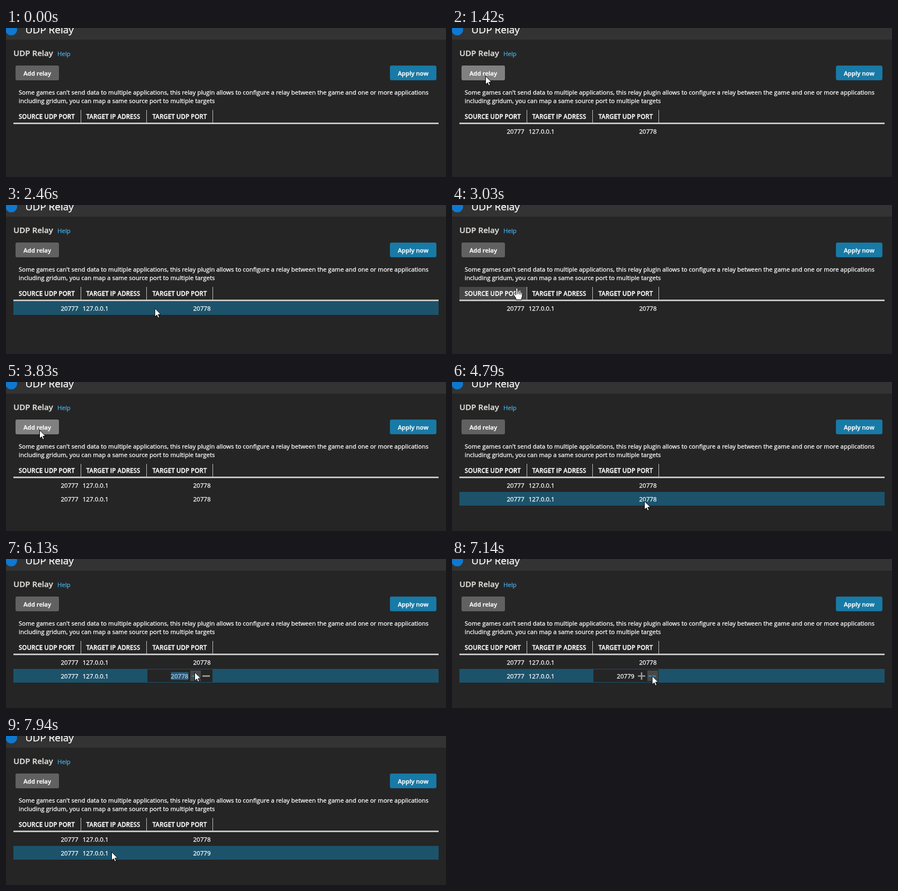
An HTML page that plays this animation: 831 by 282 pixels, repeating every 8000 ms.

```html
<!DOCTYPE html>
<html lang="en">
<head>
<meta charset="utf-8">
<title>UDP Relay</title>
<style>
html, body { margin: 0; width: 100%; height: 100%; overflow: hidden; background: #252525; }
svg { display: block; width: 831px; height: 282px; }
text {
  font: 11.44px "Open Sans", "Noto Sans", sans-serif; color: #fff;
  fill: currentColor; stroke: currentColor; stroke-width: .3px; white-space: pre;
}
.bold { font-weight: 600; }
.head { font-size: 11.6px; font-weight: 600; }
.cell { font-size: 11.6px; }
.num { text-anchor: end; }
</style>
</head>
<body>
<svg viewBox="0 0 831 282">
  <rect width="831" height="282" fill="#252525"/>
  <rect width="831" height="22" fill="#333"/>
  <circle cx="10" cy="3" r="11" fill="#0f78d0"/>
  <text x="36.5" y="10" style="font-size:19px">UDP Relay</text>
  <text x="14" y="53" class="bold" style="font-size:15.1px;color:#dedbd8">UDP Relay</text>
  <text x="97" y="53" style="font-size:11.5px;color:#45aee8">Help</text>

  <rect id="add" x="18" y="71" width="82" height="28" rx="3"/>
  <text x="33" y="90" class="bold">Add relay</text>
  <rect x="725.5" y="71.5" width="87" height="27" rx="2.5" fill="#187aa6" stroke="#1a6f96"/>
  <text x="740" y="90" class="bold" style="font-size:11.5px">Apply now</text>

  <text x="24" y="126">Some games can't send data to multiple applications, this relay plugin allows to configure a relay between the game and one or more applications</text>
  <text x="24" y="142">including gridum, you can map a same source port to multiple targets</text>

  <g id="heads"></g>
  <rect x="14" y="179" width="803" height="3" fill="#c4c4c4"/>
  <g id="rows"></g>

  <g id="edit">
    <rect x="267" y="209" width="123" height="24" fill="#252525"/>
    <rect id="mark" x="311.5" y="214" width="33" height="15" fill="#2a5876"/>
    <text id="value" x="344.5" y="226" class="cell num"></text>
    <rect id="plusBox" x="348" y="211" width="20" height="20"/>
    <path id="plus" d="M351 221.5h14M358 214.5v14" stroke-width="2.6"/>
    <rect id="minusBox" x="369" y="211" width="20" height="20"/>
    <path id="minus" d="M371 221.5h14" stroke-width="2.8"/>
  </g>

  <g id="cursor" fill="#fff" stroke="#000" stroke-linejoin="round">
    <path id="arrow" d="M.5 .5V16.6L4.2 13.1 6.6 18.6 9.1 17.5 6.7 12.1H11.8Z"/>
    <g id="hand" transform="translate(-1.5 0)">
      <path d="M-1.6 13V1.6a1.6 1.6 0 0 1 3.2 0V8c0-1.6 3-1.6 3.1.2 .3-1.3 2.9-1.2 3 .4 .4-1 2.7-.8 2.7.8v5c0 2.8-1.6 3.8-1.6 7.8H-1.2c0-3-1.9-4.9-5-9.7-.9-1.7 1.2-3.2 2.6-1.7Z"/>
      <path d="M1.6 8v4M4.7 8.2v4M7.7 8.6v4" fill="none"/>
    </g>
  </g>
</svg>
<script>
const LOOP = 8000;
const $ = id => document.getElementById(id);
const make = (parent, tag, attrs, text = "") => {
  const el = document.createElementNS("http://www.w3.org/2000/svg", tag);
  for (const k in attrs) el.setAttribute(k, attrs[k]);
  el.textContent = text;
  return parent.appendChild(el);
};
const show = (el, on) => el.setAttribute("visibility", on ? "inherit" : "hidden");
const paint = (id, attr, color) => $(id).setAttribute(attr, color);

// Pointer stops: time, x, y
const stops = [
  [0, 700, 310], [80, 629, 278], [690, 63, 90.5], [1420, 63, 90.5],
  [1950, 335, 192], [2250, 335, 192], [2460, 281, 195], [2740, 127, 190],
  [2940, 127, 190], [3030, 124, 157.5], [3240, 63, 90.5], [4090, 63, 90.5],
  [4280, 149, 212], [4410, 215, 241], [4600, 325, 231], [4790, 363, 225],
  [5810, 363, 225], [6130, 356, 214], [6300, 356, 214], [6500, 355, 220.5],
  [7010, 355, 220.5], [7120, 380, 221], [7450, 176, 219], [7680, 176, 219],
  [7940, 199, 219], [LOOP, 199, 219]
];

const slope = (i, k) => {
  const a = stops[i], b = stops[i + 1];
  return a && b ? (b[k] - a[k]) / (b[0] - a[0]) : 0;
};
const tangent = (i, k) => {
  const a = slope(i - 1, k), b = slope(i, k);
  return a * b > 0 ? 2 * a * b / (a + b) : 0;
};

// Smooth curve through the stops that never overshoots
function pointer(t) {
  let i = 0;
  while (i < stops.length - 2 && stops[i + 1][0] <= t) i++;
  const a = stops[i], b = stops[i + 1], d = b[0] - a[0], u = (t - a[0]) / d;
  const s = u * u * (3 - 2 * u);
  return [1, 2].map(k => a[k] + (b[k] - a[k]) * s
    + d * u * (1 - u) * ((1 - u) * tangent(i, k) - u * tangent(i + 1, k)));
}

const heads = [
  [14, 141, 24, "SOURCE UDP PORT"],
  [142, 265, 151.5, "TARGET IP ADRESS"],
  [266, 390, 276.5, "TARGET UDP PORT"]
].map(([x, end, tx, label]) => {
  const g = $("heads");
  const box = make(g, "rect", { x, y: 155, width: end - x, height: 24, fill: "#464646" });
  make(g, "rect", { x: end, y: 155, width: 1, height: 24, fill: "#c4c4c4" });
  make(g, "text", { x: tx, y: 172, class: "head" }, label);
  return { x, end, box };
});

const rows = [[182, 1120], [208, 3830]].map(([y, born]) => {
  const g = make($("rows"), "g", {});
  const bar = make(g, "rect", { x: 14, y, width: 803, height: 26, fill: "#1c536b" });
  make(g, "text", { x: 136.6, y: y + 18, class: "cell num" }, "20777");
  make(g, "text", { x: 144.7, y: y + 18, class: "cell" }, "127.0.0.1");
  const port = make(g, "text", { x: 386.6, y: y + 18, class: "cell num" }, "20778");
  return { y, born, g, bar, port };
});

function draw(t) {
  const [x, y] = pointer(t);
  const during = (a, b) => t >= a && t < b;
  const over = (l, top, r, bottom) => x >= l && x < r && y >= top && y < bottom;

  const pressed = during(990, 1120) || during(3700, 3830);
  paint("add", "fill", pressed ? "#929292" : over(18, 71, 100, 99) ? "#808080" : "#616161");

  let hand = false;
  for (const h of heads) {
    const on = t >= 80 && over(h.x, 155, h.end + 1, 179);
    show(h.box, on);
    hand = hand || on;
  }

  for (const r of rows) {
    show(r.g, t >= r.born);
    show(r.bar, t >= r.born && over(14, r.y, 817, r.y + 26));
  }

  const value = t < 6300 ? "20778" : "20779";
  rows[1].port.textContent = value;
  $("value").textContent = value;
  $("edit").setAttribute("display", during(5250, 7680) ? "inline" : "none");
  show($("mark"), t < 6300);
  $("value").style.color = t < 6300 ? "#a9d3ee" : "#fff";

  const onPlus = over(348, 211, 368, 231), onMinus = over(369, 211, 389, 231);
  paint("plusBox", "fill", during(6300, 6420) ? "#6a6a6a" : onPlus ? "#484848" : "#252525");
  paint("plus", "stroke", onPlus ? "#2b83b0" : "#9c9c9c");
  paint("minusBox", "fill", onMinus ? "#484848" : "#252525");
  paint("minus", "stroke", onMinus ? "#2b83b0" : "#9c9c9c");

  show($("cursor"), t >= 80);
  $("cursor").setAttribute("transform", `translate(${x.toFixed(2)} ${y.toFixed(2)})`);
  show($("arrow"), !hand);
  show($("hand"), hand);
}

const start = performance.now();
function tick() {
  draw((performance.now() - start) % LOOP);
  requestAnimationFrame(tick);
}
tick();
</script>
</body>
</html>
```
